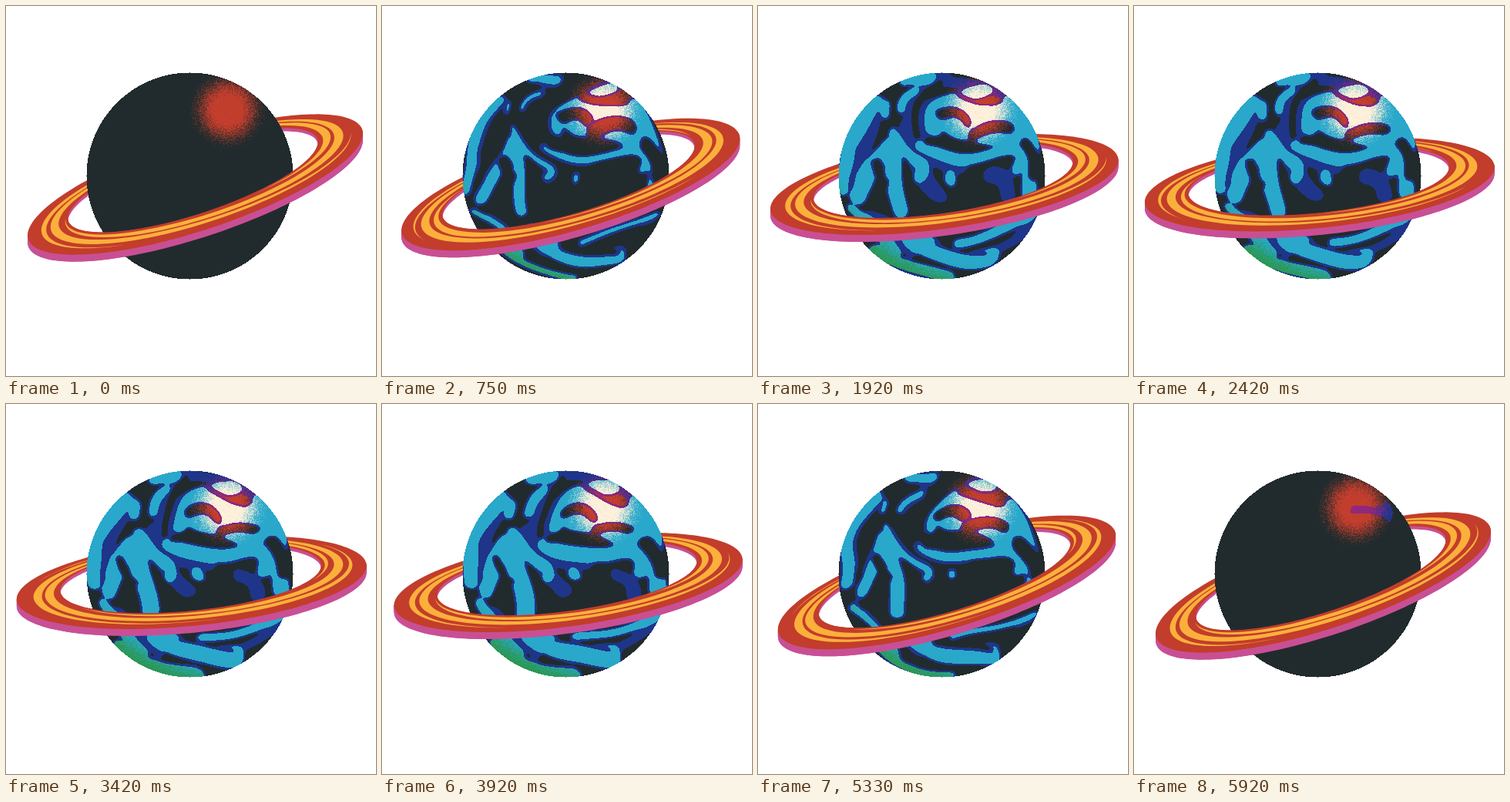
An HTML page with a canvas that plays this animation: 480x480 px, repeating every 6.01 s.

```html
<!DOCTYPE html>
<html lang="en">
<head>
<meta charset="utf-8">
<title>Ringed planet</title>
<style>
html, body { margin: 0; width: 100%; height: 100%; overflow: hidden; background: #fff; }
canvas { display: block; }
</style>
</head>
<body>
<canvas id="stage" width="480" height="480"></canvas>
<script>
const SIZE = 480, LOOP = 6010, STEPS = 72, TAU = Math.PI * 2;
const PLANET = { x: 238.5, y: 220.5, r: 134 };
const LIGHT = { x: 287, y: 134 };
const RED = '#c23d2b', YELLOW = '#fbb03b', PINK = '#c94f95';
const DARK = [33, 43, 45], NAVY = [31, 53, 137], CYAN = [41, 168, 203];
const GLOW_DARK = [196, 62, 45], GLOW_NAVY = [145, 40, 125], GLOW_CYAN = [255, 240, 218];
const GREEN = [43, 151, 78];

const ctx = document.getElementById('stage').getContext('2d');
const clamp = v => Math.max(0, Math.min(1, v));
const lerp = (a, b, k) => a + (b - a) * k;

function makeCanvas() {
  const c = document.createElement('canvas');
  c.width = c.height = SIZE;
  return c.getContext('2d', { willReadFrequently: true });
}

// Marbling: "width path" strokes, blurred into a smooth height field.
const navyStrokes = [
  '26 M238 92Q188 135 207 172T262 204', '20 M305 218Q328 222 325 248',
  '20 M158 122Q128 185 135 215', '18 M145 272Q190 295 200 322',
  '24 M190 160Q205 210 235 245', '16 M250 96Q300 92 330 125',
  '14 M265 320Q320 325 355 280'
];
const cyanStrokes = [
  '18 M152 122Q115 165 115 190T112 235', '15 M192 96L224 94', '9 M167 127L164 142',
  '10 M208 112Q187 120 185 138', '20 M166 178Q150 205 132 246',
  '22 M170 182Q178 220 184 268', '11 M170 162Q185 195 206 205T212 225',
  '14 M250 222L251 224', '17 M226 160Q222 120 298 108',
  '52 M256 142Q290 145 322 160', '22 M330 130Q362 165 354 245',
  '15 M212 182Q250 206 300 193T336 215',
  '27 M198 298Q235 332 300 326', '11 M255 304Q320 294 362 268',
  '14 M150 312Q180 345 250 352', '12 M122 262Q150 285 180 322'
];
const darkStrokes = [
  '7 M238 98Q194 138 206 172', '9 M217 177Q240 182 282 178',
  '13 M236 143Q258 130 270 147', '14 M276 164Q300 150 322 160',
  '7 M262 113Q290 127 308 126', '11 M307 125L309 126',
  '17 M343 180Q362 200 360 220', '12 M153 202L158 214',
  '8 M160 242L168 226', '5 M228 308Q262 318 300 320'
];

function makeField() {
  const ink = makeCanvas(), soft = makeCanvas();
  ink.fillRect(0, 0, SIZE, SIZE);
  ink.lineCap = 'round';
  const paint = (strokes, color) => strokes.forEach(s => {
    const cut = s.indexOf(' ');
    ink.lineWidth = s.slice(0, cut);
    ink.strokeStyle = color;
    ink.stroke(new Path2D(s.slice(cut + 1)));
  });
  paint(navyStrokes, '#6c6c6c');
  paint(cyanStrokes, '#fff');
  paint(darkStrokes, '#000');
  soft.filter = 'blur(3.2px)';
  soft.drawImage(ink.canvas, 0, 0);
  return soft.getImageData(0, 0, SIZE, SIZE).data;
}

const field = makeField();
const globe = makeCanvas();
const pixels = globe.createImageData(SIZE, SIZE);
const ringLayer = makeCanvas();

function sample(x, y) {
  const x0 = Math.floor(x), y0 = Math.floor(y), at = (y0 * SIZE + x0) * 4;
  const below = at + SIZE * 4;
  return lerp(
    lerp(field[at], field[at + 4], x - x0),
    lerp(field[below], field[below + 4], x - x0), y - y0) / 255;
}

function grain(x, y) {
  const v = Math.sin(x * 12.9898 + y * 78.233) * 43758.5453;
  return v - Math.floor(v);
}

function drawGlobe(step) {
  const phase = step / STEPS * TAU;
  const fade = (1 - clamp(Math.min(step, STEPS - step) / 16)) ** 1.8;
  for (let y = 86; y < 356; y++) for (let x = 104; x < 374; x++) {
    if (Math.hypot(x + .5 - PLANET.x, y + .5 - PLANET.y) > PLANET.r) continue;
    const sx = x + 3 * Math.sin(y / 19 + phase) + 2 * Math.sin(x / 13 - phase);
    const sy = y + 3 * Math.sin(x / 21 - phase) + 2 * Math.sin(y / 11 + phase);
    // The pattern starts and ends beside the highlight.
    const seed = Math.exp(-((x - 308) ** 2 + (y - 139) ** 2) / 900);
    const level = sample(sx, sy) + fade * (.3 * seed - 1.06);
    const d = Math.hypot(x - LIGHT.x, y - LIGHT.y);
    const rough = (grain(x, y) - .5) * .7;
    const lit = clamp((54 - d) / 37);
    const glow = clamp((lit - .5) * 1.6 + .42 + rough);
    let base = DARK, bright = GLOW_DARK, amount = glow;
    if (level > .55) {
      const shade = clamp((d - 205) / 25 + rough);
      base = CYAN;
      bright = shade ? GREEN : GLOW_CYAN;
      amount = shade || glow;
    } else if (level > .27) {
      base = NAVY;
      bright = GLOW_NAVY;
    }
    const i = (y * SIZE + x) * 4;
    for (let c = 0; c < 3; c++) pixels.data[i + c] = lerp(base[c], bright[c], amount);
    pixels.data[i + 3] = 255;
  }
  globe.putImageData(pixels, 0, 0);
  ctx.drawImage(globe.canvas, 0, 0);
}

// Paints the whole ring on its layer and returns the region in front of the planet.
function paintRing(step) {
  const swing = Math.cos((step + 1) / STEPS * TAU);
  const tilt = (11.7 + 6.5 * swing) * TAU / 360;
  const cos = Math.cos(tilt), sin = Math.sin(tilt);
  // k runs from the hole (0) to the rim (1).
  const point = (angle, k) => {
    const u = lerp(170, 228, k) * Math.cos(angle);
    const v = lerp(43 + swing, 58 + 2 * swing, k) * Math.sin(angle);
    return [
      lerp(241 + 1.5 * swing, 243 + 2.5 * swing, k) + u * cos + v * sin,
      lerp(226, 231.5, k) - u * sin + v * cos
    ];
  };
  const trace = (path, points, dy = 0) => {
    points.forEach(([x, y], i) => path[i ? 'lineTo' : 'moveTo'](x, y + dy));
    path.closePath();
  };
  const oval = k => Array.from({ length: 180 }, (_, i) => point(i / 180 * TAU, k));
  const rim = oval(1), hole = oval(0);
  const fillBand = (color, depth) => {
    const path = new Path2D();
    trace(path, rim, depth);
    trace(path, hole, depth * .45);
    ringLayer.fillStyle = color;
    ringLayer.fill(path, 'evenodd');
  };

  ringLayer.clearRect(0, 0, SIZE, SIZE);
  for (let depth = 1; depth <= 9; depth += 2) fillBand(PINK, depth);
  fillBand(RED, 0);
  ringLayer.fillStyle = YELLOW;
  for (let n = 0; n < 3; n++) {
    const start = (66 + n * 120 + step * 5) * TAU / 360;
    const outer = [], inner = [];
    for (let i = 0; i <= 90; i++) {
      const u = i / 90;
      const angle = start - u * 305 / 360 * TAU;
      const half = .1 * Math.min(1, u * 4, (1 - u) * 3);
      const mid = .06 + .68 * u;
      outer.push(point(angle, mid + half));
      inner.unshift(point(angle, Math.max(0, mid - half)));
    }
    const arm = new Path2D();
    trace(arm, outer.concat(inner));
    ringLayer.fill(arm);
  }

  const front = new Path2D();
  const reach = (u, v) => [242 + u * cos + v * sin, 229 - u * sin + v * cos];
  trace(front, [reach(-300, 0), reach(300, 0), reach(300, 200), reach(-300, 200)]);
  return front;
}

let shown = -1;
function frame(now) {
  const step = Math.floor((now % LOOP) / LOOP * STEPS);
  if (step !== shown) {
    shown = step;
    ctx.fillStyle = '#fff';
    ctx.fillRect(0, 0, SIZE, SIZE);
    const front = paintRing(step);
    ctx.drawImage(ringLayer.canvas, 0, 0);
    drawGlobe(step);
    ctx.save();
    ctx.clip(front);
    ctx.drawImage(ringLayer.canvas, 0, 0);
    ctx.restore();
  }
  requestAnimationFrame(frame);
}
frame(performance.now());
</script>
</body>
</html>
```
